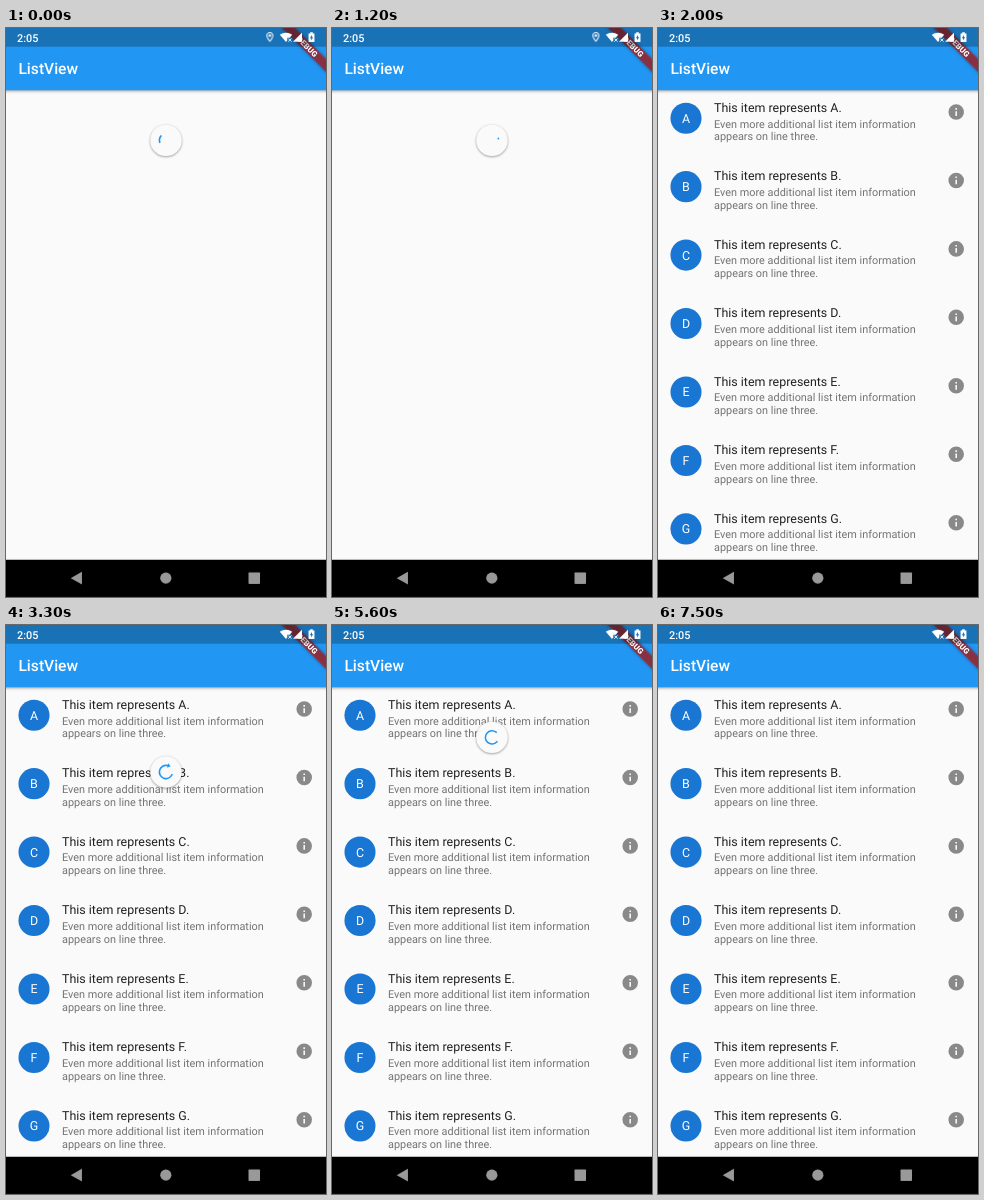
Animation of 320x569 px, one loop 9 s. Source, as an HTML page:

```html
<!DOCTYPE html>
<html lang="en">
<head>
<meta charset="utf-8">
<title>ListView</title>
<style>
  html, body { margin: 0; width: 100%; height: 100%; overflow: hidden; background: #fafafa; }
  svg { display: block; width: 320px; height: 569px; font-family: Roboto, "Noto Sans", sans-serif; text-rendering: geometricPrecision; }
  .title { font-size: 16px; fill: rgba(0, 0, 0, .87); }
  .sub { font-size: 14px; fill: rgba(0, 0, 0, .54); }
  .letter { font-size: 16px; fill: #fff; text-anchor: middle; }
  .bar { filter: drop-shadow(0 1.5px 2px rgba(0, 0, 0, .4)); }
  .disc { fill: #fafafa; filter: drop-shadow(0 1px 1.2px rgba(0, 0, 0, .4)); }
  .ribbon { fill: #b71c1c; fill-opacity: .7; filter: drop-shadow(0 0 2px rgba(0, 0, 0, .5)); }
  #pin { animation: pin 9s step-end infinite; }
  @keyframes pin { 0% { opacity: 1; } 22.2222% { opacity: 0; } 100% { opacity: 0; } }
</style>
</head>
<body>
<!-- One unit is one density-independent pixel of the phone screen. -->
<svg viewBox="0 0 411.43 731.57">
  <rect width="412" height="732" fill="#fafafa"/>
  <g id="list"></g>

  <g id="spinner">
    <circle class="disc" r="20.2"/>
    <path id="arc" fill="none" stroke="#2196f3" stroke-width="2" stroke-linecap="square"/>
    <path id="tip" fill="#2196f3"/>
  </g>

  <rect class="bar" x="-9" y="-9" width="430" height="89" fill="#2196f3"/>
  <text x="16" y="59" font-size="20" font-weight="500" fill="#fff">ListView</text>
  <g transform="translate(411.43 0) rotate(45)">
    <rect class="ribbon" x="-45" y="28" width="90" height="12"/>
    <text y="37.6" font-size="10.2" font-weight="900" fill="#fff" text-anchor="middle">DEBUG</text>
  </g>

  <rect width="412" height="24" fill="#000" fill-opacity=".25"/>
  <g fill="#fff">
    <text x="14.2" y="17.4" font-size="14" font-weight="500">2:05</text>
    <g id="pin" transform="translate(331.6 4) scale(.64)">
      <path fill-rule="evenodd" d="M12 2C8.1 2 5 5.1 5 9c0 5.3 7 13 7 13s7-7.7 7-13c0-3.9-3.1-7-7-7zM7 9a5 5 0 0 1 10 0c0 2.9-2.9 7.2-5 9.9C9.9 16.2 7 11.9 7 9z"/>
      <circle cx="12" cy="9" r="2.5"/>
    </g>
    <path d="M352 8.6Q360 3.2 368 8.6L364.8 12.4H361.6V15.8L360 17.7Z"/>
    <path d="M363 13.4l4 4m0-4l-4 4" stroke="#fff" stroke-width="1.2"/>
    <path d="M369 17.6L380.6 6V17.6Z"/>
    <path fill-rule="evenodd" d="M389 6.8H391.2V5.4H394.4V6.8H396.6V18H389ZM393.4 8.8L390.6 13H392.3V16L395 11.8H393.4Z"/>
  </g>

  <rect y="683.6" width="412" height="48.4" fill="#000"/>
  <g fill="#999">
    <path d="M83.2 707.2L97.6 699V715.4Z"/>
    <circle cx="205.5" cy="707.2" r="7.2"/>
    <rect x="311.8" y="699.8" width="14.8" height="14.8" rx="1"/>
  </g>
</svg>
<script>
  const $ = id => document.getElementById(id);
  const list = $('list'), spinner = $('spinner'), arc = $('arc'), tip = $('tip');
  const LOOP = 9000, STEP = 100, REST = 2 / 3, R = 8.5;

  list.innerHTML = [...'ABCDEFG'].map((c, i) => `
    <g transform="translate(0 ${80 + 88 * i})">
      <circle cx="36" cy="36" r="20" fill="#1976d2"/>
      <text class="letter" x="36" y="41.7">${c}</text>
      <text class="title" x="72" y="28">This item represents ${c}.</text>
      <text class="sub" x="72" y="48">Even more additional list item information</text>
      <text class="sub" x="72" y="64.4">appears on line three.</text>
      <path transform="translate(371.4 16)" fill="#000" fill-opacity=".45"
        d="M12 2a10 10 0 1 0 0 20 10 10 0 1 0 0-20zm1 15h-2v-6h2v6zm0-8h-2V7h2v2z"/>
    </g>`).join('');

  // cubic-bezier(.4, 0, .2, 1)
  function ease(x) {
    if (x <= 0 || x >= 1) return x <= 0 ? 0 : 1;
    let lo = 0, hi = 1, s;
    for (let i = 0; i < 24; i++) {
      s = (lo + hi) / 2;
      const bx = 1.2 * (1 - s) ** 2 * s + .6 * (1 - s) * s * s + s ** 3;
      if (bx < x) lo = s; else hi = s;
    }
    return 3 * (1 - s) * s * s + s ** 3;
  }

  const spin = (phase, scale = 1) => ({ pos: REST, phase, scale });
  const drag = pos => ({ pos, phase: .375 * pos, scale: 1, arrow: true });

  // Spinner state at time step k
  function pose(k) {
    if (k < 12) return spin(1.12 + .0885 * Math.min(k, 9));
    if (k < 13) return spin(2.005);
    if (k < 32 || k >= 75) return null;
    if (k < 33) return drag(.8);
    if (k < 49) return drag(1);
    if (k < 53) return drag([.9, .75, REST, REST][k - 49]);
    if (k < 58) return spin(.165 + .0885 * Math.min(k - 53, 3));
    return spin(.43 + .08 * (k - 57), k < 73 ? 1 : k < 74 ? .6 : .2);
  }

  function drawSpinner({ pos, phase, scale, arrow }) {
    const turn = Math.floor(phase), p = phase - turn;
    const head = ease(p * 2), tail = ease(p * 2 - 1);
    const start = Math.PI * (-.5 + 1.5 * tail + 1.7 * p - .8 * turn);
    const sweep = Math.max(1.5 * Math.PI * (head - tail), .02);
    const end = start + sweep;
    const at = (a, r) => `${(r * Math.cos(a)).toFixed(3)} ${(r * Math.sin(a)).toFixed(3)}`;
    spinner.setAttribute('transform', `translate(205.7 ${55.5 + 133.5 * pos}) scale(${scale})`);
    arc.setAttribute('d', `M${at(start, R)}A${R} ${R} 0 ${+(sweep > Math.PI)} 1 ${at(end, R)}`);
    const point = at(end + Math.atan(4 / R), Math.hypot(R, 4));
    tip.setAttribute('d', arrow ? `M${at(end, R - 3)}L${at(end, R + 3)}L${point}Z` : '');
  }

  function frame() {
    const k = Math.floor(performance.now() % LOOP / STEP);
    const state = pose(k);
    list.style.display = k < 13 ? 'none' : '';
    spinner.style.display = state ? '' : 'none';
    if (state) drawSpinner(state);
    requestAnimationFrame(frame);
  }
  frame();
</script>
</body>
</html>
```
